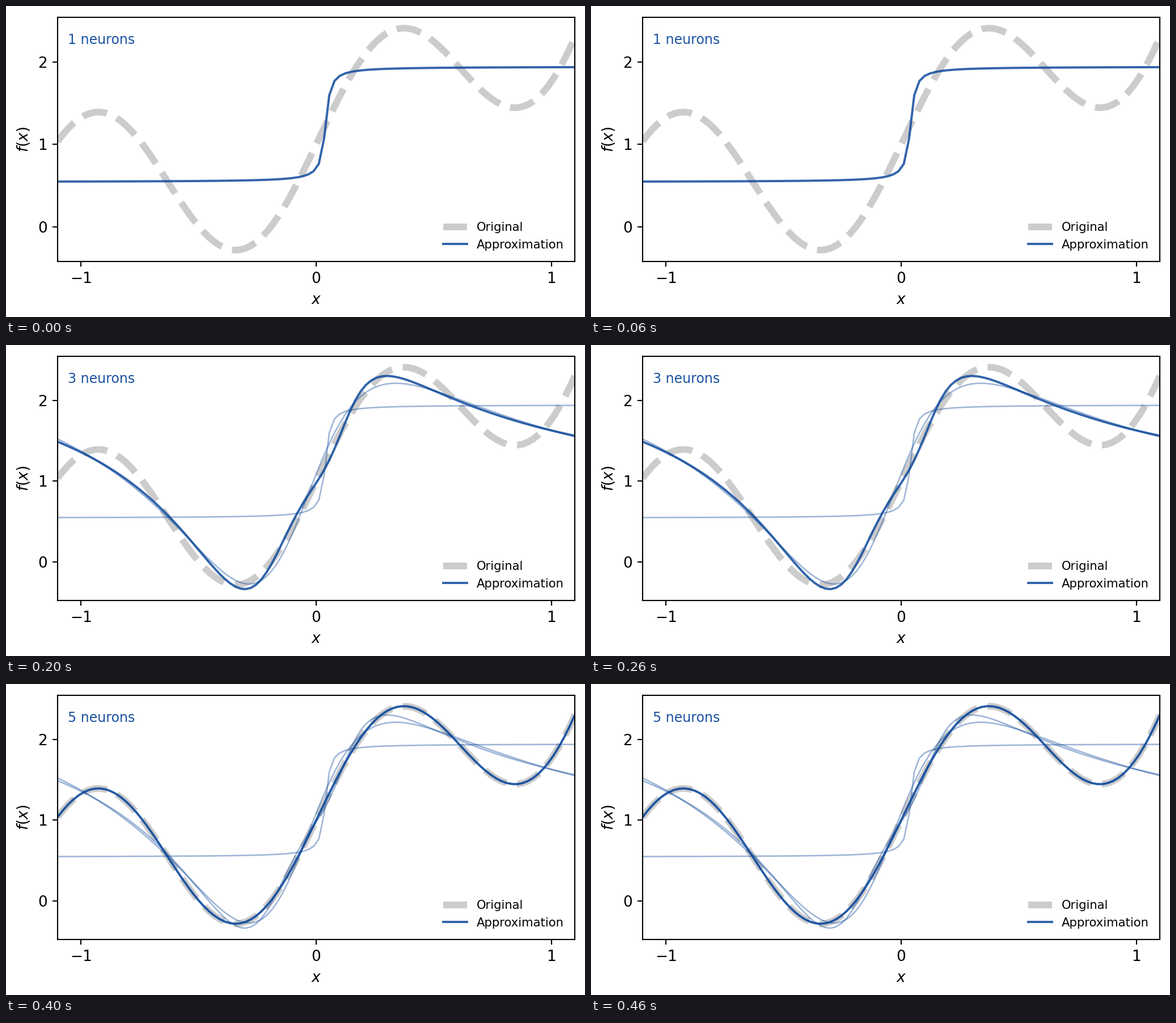
A matplotlib script that plays this animation: 1021 by 549 pixels, repeating every 500 ms.

```python
import numpy as np
import matplotlib.pyplot as plt
from matplotlib.animation import FuncAnimation

W, H, DPI = 1021, 549, 190
LEFT, BOTTOM, WIDTH, HEIGHT = 91, 98.45, 912, 431
BLUE, GRAY = "#0f4a9c", "#cccccc"

plt.rcParams.update({"font.family": "DejaVu Sans", "font.size": 10,
                     "mathtext.fontset": "dejavusans"})

x = np.linspace(-1.1, 1.1, 100)
f = np.exp(x) + np.sin(5 * x)


def network(p):
    """Best weighted sum of arctan neurons with given centres and log widths."""
    centre, log_width = np.split(p, 2)
    neurons = np.arctan((x[:, None] - centre) / np.exp(log_width))
    layer = np.column_stack([np.ones_like(x), neurons])
    return layer @ np.linalg.lstsq(layer, f, rcond=None)[0]


def fit(centres, widths, steps=300):
    """Least-squares fit to f by Levenberg-Marquardt."""
    p = np.concatenate([centres, np.log(widths)])
    y, damp, eps = network(p), 1e-2, 1e-6
    for _ in range(steps):
        jac = np.column_stack([(network(p + d) - y) / eps
                               for d in eps * np.eye(len(p))])
        hess = jac.T @ jac
        scale = np.diag(np.diag(hess) + 1e-9)
        step = np.linalg.solve(hess + damp * scale, jac.T @ (f - y))
        trial = p + np.clip(step, -.3, .3)
        y_trial = network(trial)
        if np.sum((f - y_trial)**2) < np.sum((f - y)**2):
            p, y, damp = trial, y_trial, max(damp / 3, 1e-9)
        else:
            damp = min(damp * 4, 1e9)
    return y


# starting centres and widths for one to five neurons
fits = [fit([.04], [1 / 64]),
        fit([-.05, -.13], [.25, .4]),
        fit([-.12, .11, -.15], [.18, .1, .45]),
        fit([-.63, .02, .6, 1.2], [.3] * 4),
        fit([-1.2, -.63, .02, .6, 1.2], [.3] * 5)]

fig = plt.figure(figsize=((W + .01) / DPI, (H + .01) / DPI), dpi=DPI,
                 facecolor="white")
ax = fig.add_axes([LEFT / W, BOTTOM / H, WIDTH / W, HEIGHT / H])
ax.set(xlim=(-1.1, 1.1), xticks=[-1, 0, 1], yticks=[0, 1, 2],
       xlabel="$x$", ylabel="$f(x)$")

ax.plot(x, f, "--", color=GRAY, lw=4.5, label="Original")
past = [ax.plot(x, y, color=BLUE, lw=1, alpha=.4)[0] for y in fits[:-1]]
current, = ax.plot(x, fits[0], color=BLUE, lw=1.5, alpha=.85,
                   label="Approximation")
count = ax.text(.02, .889, "", transform=ax.transAxes, fontsize=9,
                color=BLUE, alpha=.95)
ax.legend(loc="lower right", frameon=False, fontsize=8)


def update(i):
    current.set_ydata(fits[i])
    for k, line in enumerate(past):
        line.set_visible(k < i)
    count.set_text(f"{i + 1} neurons")
    shown = np.concatenate([f, *fits[:i + 1]])
    lo, hi = shown.min(), shown.max()
    pad = .05 * (hi - lo)
    ax.set_ylim(lo - pad, hi + pad)
    return [current, count, *past]


anim = FuncAnimation(fig, update, frames=len(fits), interval=100,
                     init_func=lambda: update(0), repeat=True,
                     repeat_delay=0, blit=False)
plt.show()
```
